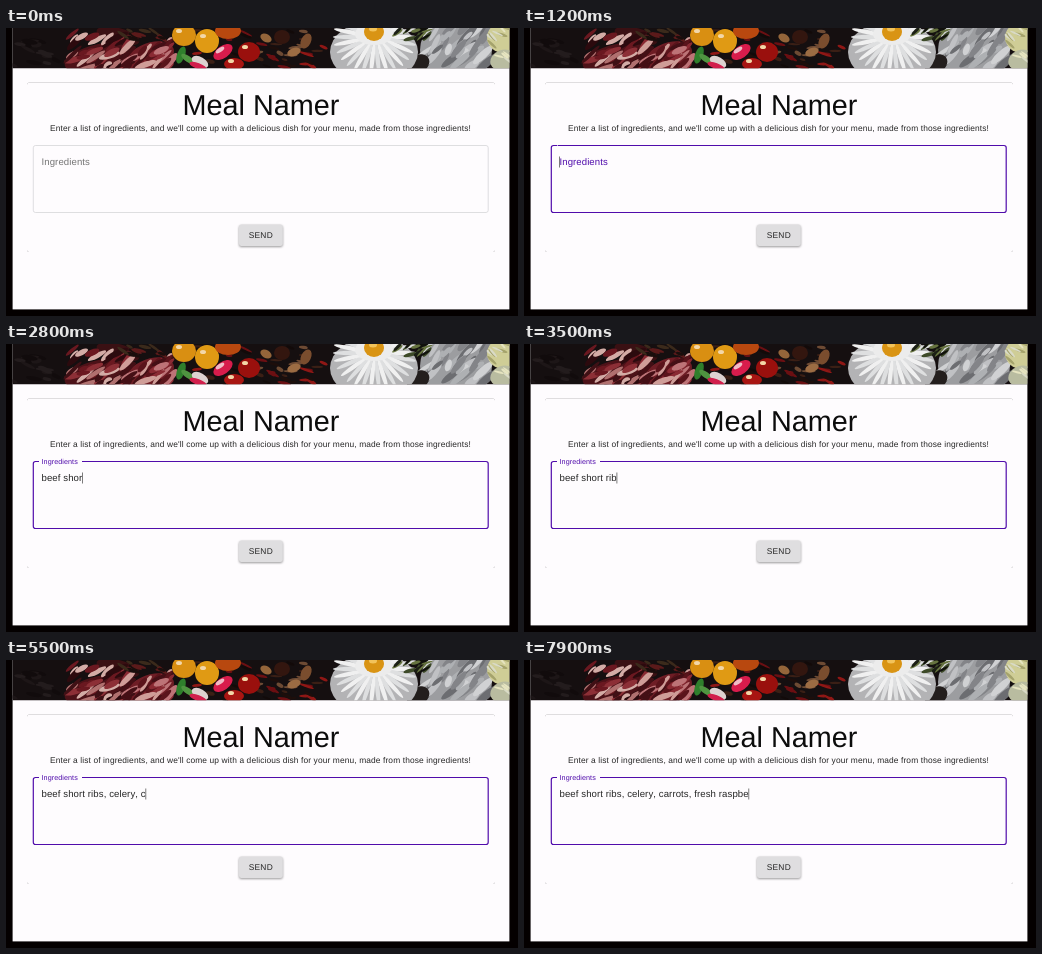
Animation of 512 by 288 pixels, one loop 8000 ms. Source, as an HTML page:

```html
<!DOCTYPE html>
<html lang="en">
<head>
<meta charset="utf-8">
<title>Meal Namer</title>
<style>
  html, body { margin: 0; width: 100%; height: 100%; overflow: hidden; background: #040000; }
  svg { display: block; width: 512px; height: 288px; }
  text { font-family: "Liberation Sans", Arial, sans-serif; font-kerning: none;
         text-rendering: geometricPrecision; fill: #262626; }
  .field { font-size: 9.6px; letter-spacing: .09px; }
  .card { filter: drop-shadow(0 .8px .4px rgba(0,0,0,.38)) drop-shadow(0 0 .6px rgba(0,0,0,.12)); }
  .button { filter: drop-shadow(0 1px .9px rgba(0,0,0,.4)); }
</style>
</head>
<body>
<svg viewBox="0 0 512 288">
  <clipPath id="strip"><rect x="6.6" width="496.8" height="40.2"/></clipPath>
  <rect width="512" height="288" fill="#040000"/>
  <rect x="6.6" width="496.8" height="281.4" fill="#fefcfe"/>
  <g id="photo" clip-path="url(#strip)"><rect width="512" height="41" fill="#150f10"/></g>

  <rect class="card" x="21" y="54.4" width="468" height="169.6" rx="2.5" fill="#fefcfe"/>
  <text x="255" y="87" font-size="28.8" text-anchor="middle" style="fill:#0c0c0c">Meal Namer</text>
  <text x="44" y="102.6" font-size="8.4" letter-spacing=".12">Enter a list of ingredients, and we'll come up with a delicious dish for your menu, made from those ingredients!</text>

  <rect id="box" x="27.3" y="117.5" width="454.9" height="67" rx="2.2" fill="none"/>
  <rect id="notch" x="33" y="115" height="5" fill="#fefcfe"/>
  <text id="label" class="field">Ingredients</text>
  <text id="typed" class="field" x="35.5" y="137.2"></text>
  <rect id="caret" y="128.5" width=".7" height="11" fill="#444"/>

  <rect class="button" x="233" y="196.5" width="43.8" height="21.6" rx="2.4" fill="#dfdee0"/>
  <text x="242.7" y="210.3" font-size="8.4" letter-spacing=".24">SEND</text>
</svg>
<script>
const $ = id => document.getElementById(id);
const LOOP = 8000, FOCUS = 1200, LEFT = 35.5, PURPLE = '#500cab';

function blob(x, y, rx, ry, fill, turn = 0) {
  const e = document.createElementNS('http://www.w3.org/2000/svg', 'ellipse');
  const attrs = { cx: x, cy: y, rx, ry, fill, transform: `rotate(${turn} ${x} ${y})` };
  for (const k in attrs) e.setAttribute(k, attrs[k]);
  $('photo').append(e);
}

let seed = 7;
const rnd = (a, b) => a + (b - a) * ((seed = seed * 16807 % 2147483647) / 2147483647);

// scatter n small pieces in a region
function scatter(n, x0, x1, y0, y1, size, colours, turn) {
  for (let i = 0; i < n; i++)
    blob(rnd(x0, x1), rnd(y0, y1), rnd(size / 2, size * 1.3), rnd(size / 6, size / 3),
         colours[i % colours.length], turn + rnd(-20, 20));
}

function drawPhoto() {
  scatter(14, 6, 54, 0, 40, 8, ['#1d1617', '#110b0c', '#231c1d'], 10);
  // cured meat
  blob(94, 30, 36, 14, '#4c1218', -12);
  blob(112, 8, 22, 8, '#3a1013', 15);
  blob(144, 29, 25, 14, '#6e1d25', -20);
  scatter(46, 66, 122, 6, 40, 10, ['#6a1820', '#b0706f', '#2c0a0e', '#8c2f36', '#d3aca6', '#3f1015'], -30);
  scatter(30, 120, 166, 14, 40, 10, ['#8a2a33', '#bd7377', '#440f15', '#cf9d98', '#5a141b'], -35);
  scatter(12, 116, 162, 0, 12, 6, ['#1a0e0c', '#5b1a1a', '#3b2a1b'], 20);
  // fruit, nuts and beans
  scatter(44, 178, 320, 0, 40, 6, ['#6b0f12', '#1d0e0b', '#8f1715', '#3b1f15', '#120a09', '#6d4a33'], 10);
  blob(178, 7, 12, 11, '#d98f12');
  blob(201, 13, 12, 12, '#e09a14');
  blob(222, 3, 13, 8, '#b8480f');
  blob(175, 27, 4, 9, '#2f7f2c', 20);
  blob(182, 31, 8, 3, '#4f9440', 35);
  blob(194, 34, 9, 5, '#ddd2d0', 30);
  blob(192, 38, 9, 3, '#d11f4c', 20);
  blob(217, 24, 11, 6, '#d81c4c', -35);
  blob(214, 22, 5, 2, '#efbcc6', -35);
  blob(243, 24, 11, 10, '#9a100d');
  blob(228, 36, 10, 6, '#a81512');
  blob(276, 9, 8, 7, '#33160f');
  blob(260, 10, 6, 4, '#94653a', 30);
  blob(300, 13, 5, 8, '#7a4d2e', 25);
  blob(288, 24, 7, 4, '#9c6c43', -20);
  for (const [x, y] of [[173, 3], [197, 8], [239, 19], [225, 33]]) blob(x, y, 3, 2, '#f3d7a8');
  // folds of cloth
  blob(450, 22, 36, 34, '#9c9da0');
  scatter(34, 420, 482, 0, 40, 12, ['#c0c1c4', '#6c6d71', '#aeb0b3', '#838488', '#d0d1d3'], -50);
  blob(412, 36, 12, 9, '#231e1d', -30);
  // cheese rosette with egg
  blob(368, 24, 44, 31, '#b3b3b5');
  for (let a = 0; a < 360; a += 12) {
    const r = a * Math.PI / 180;
    blob(369 + 25 * Math.cos(r), 9 + 22 * Math.sin(r), 17, 2.2, a % 24 ? '#dedfe0' : '#f0f0f0', a);
  }
  blob(368, 6, 19, 11, '#ececec');
  blob(368, 4, 10, 9, '#d99414');
  blob(367, 1, 4, 2.5, '#f2c35a');
  scatter(16, 390, 424, 0, 11, 6, ['#3d4a28', '#1b1f14', '#66733f', '#10100c'], -30);
  // crackers
  blob(497, 10, 16, 15, '#cfcd96', 20);
  blob(497, 32, 13, 10, '#b9bca0', -20);
  scatter(12, 484, 504, 0, 38, 5, ['#e6e4c0', '#a5a36c', '#d9dac6'], 30);
}

// bursts of typing: start in tenths of a second, one character per tenth
const keys = [[19, 'beef'], [24, ' shor'], [30, 't '], [33, 'rib'], [37, 's'], [40, ', '], [43, 'c'],
  [45, 'el'], [48, 'er'], [51, 'y, '], [55, 'carrots'], [63, ', '], [66, 'fre'], [70, 'sh '],
  [72, 'r'], [74, 'asp'], [78, 'be']]
  .flatMap(([at, chars]) => [...chars].map((c, i) => [(at + i) * 100, c.replace(' ', '\u00a0')]));

function draw(t) {
  const focused = t >= FOCUS;
  const p = Math.min(1, Math.max(0, (t - FOCUS) / 200));
  const ease = 1 - (1 - p) ** 3;

  $('box').setAttribute('stroke', focused ? PURPLE : '#d2d1d4');
  $('box').setAttribute('stroke-width', focused ? 1.2 : .7);
  $('notch').setAttribute('width', 43 * ease);
  $('label').setAttribute('transform', `translate(${LEFT} ${137.2 - 17.6 * ease}) scale(${1 - .25 * ease})`);
  $('label').style.fill = focused ? PURPLE : '#757575';

  const done = keys.filter(k => k[0] <= t);
  const text = done.map(k => k[1]).join('');
  if ($('typed').textContent !== text) $('typed').textContent = text;
  const last = done.length ? done[done.length - 1][0] : FOCUS;
  const width = text ? $('typed').getComputedTextLength() : 0;
  $('caret').setAttribute('x', LEFT + width - .2);
  $('caret').setAttribute('opacity', focused && (t - last) % 1000 < 500 ? 1 : 0);
}

function tick() {
  draw(performance.now() % LOOP);
  requestAnimationFrame(tick);
}

drawPhoto();
tick();
</script>
</body>
</html>
```
